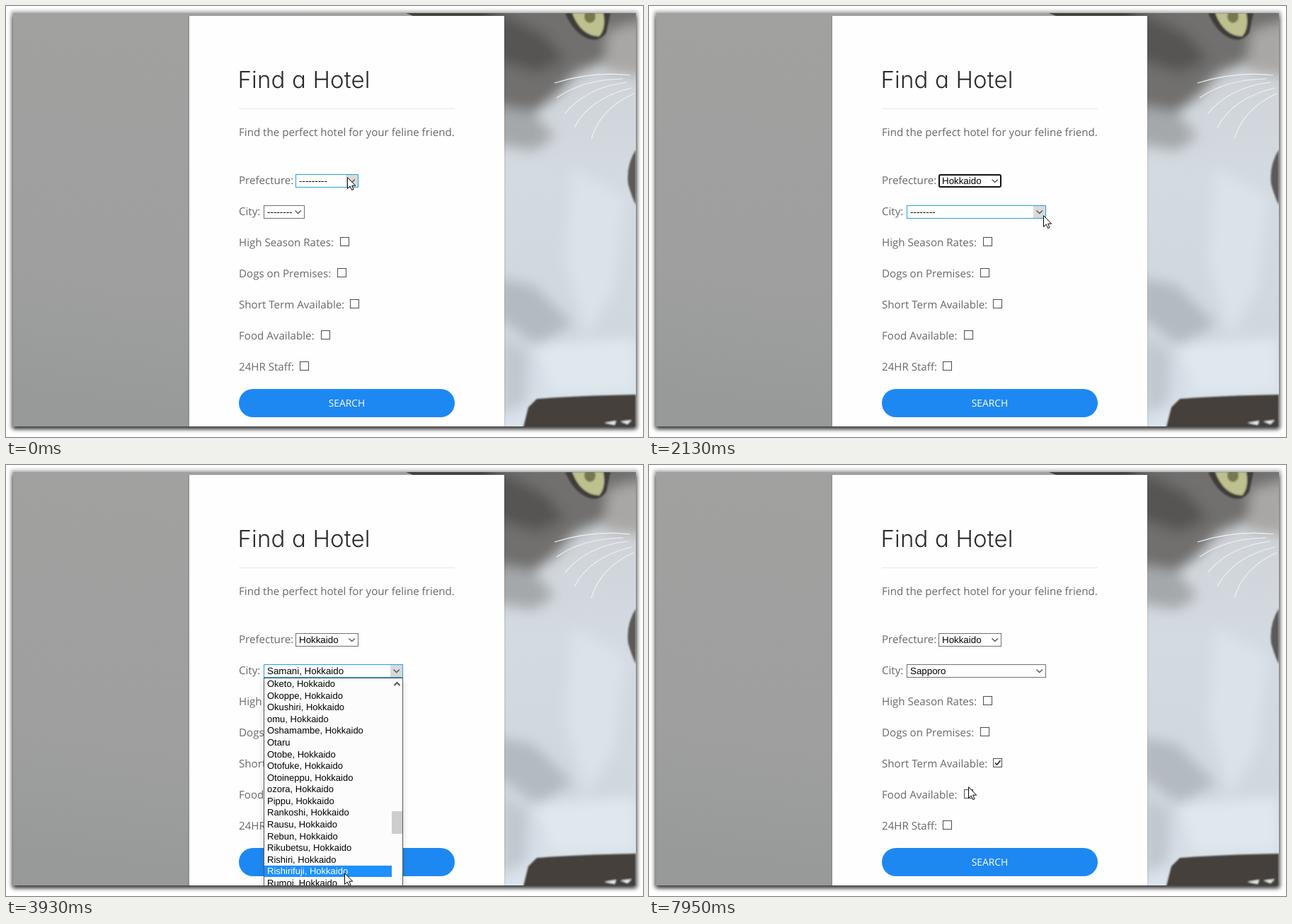
Animation of 900 by 610 pixels, one loop 8000 ms. Source, as an HTML page:

```html
<!DOCTYPE html>
<html lang="en">
<head>
<meta charset="utf-8">
<title>Find a Hotel</title>
<style>
  html, body { margin: 0; width: 100%; height: 100%; overflow: hidden; background: #fff; }
  #win {
    position: absolute; left: 10px; top: 10px; width: 880px; height: 585px;
    box-shadow: 0 0 5px 3px rgba(0, 0, 0, .28), 0 4px 6px rgba(0, 0, 0, .7);
  }
  svg { display: block; width: 880px; height: 585px; overflow: hidden; }
  text { text-rendering: geometricPrecision; white-space: pre; }
  .title { font: 300 33px Inter, Lato, sans-serif; font-feature-settings: "cv11"; letter-spacing: .15px; fill: #2b2b2f; }
  .label { font: 15.14px "Open Sans", "Noto Sans", sans-serif; fill: #68686b; }
  .go { font: 13.8px "Open Sans", "Noto Sans", sans-serif; fill: #fff; text-anchor: middle; }
  .opt { font: 13.333px "Liberation Sans", Arial, sans-serif; fill: #000; }
  .list .opt { font-size: 13px; }
  .opt.on { fill: #fff; }
  .frame { fill: #fff; stroke: #6f6f6f; }
  .arrow { fill: none; stroke: #555; stroke-width: 1.4; }
  .list .arrow { stroke-width: 2; }
  .grip { fill: #dadada; visibility: hidden; }
  .hover .frame { stroke: #26a0da; }
  .hover .grip { visibility: visible; }
  .focus .frame { stroke: #111; stroke-width: 2; }
  .box rect { fill: #fff; stroke: #4c4c4c; }
  .box path { fill: none; stroke: #222; stroke-width: 1.6; visibility: hidden; }
  .box.hot rect { stroke: #0078d7; }
  .box.ticked path { visibility: visible; }
  .list { display: none; }
</style>
</head>
<body>
<div id="win">
<svg id="svg" viewBox="10 10 880 585">
  <defs>
    <linearGradient id="wall" x1=".6" y1="0" x2="0.4" y2="1">
      <stop offset="0" stop-color="#a1a1a0"/>
      <stop offset=".7" stop-color="#9f9f9f"/>
      <stop offset="1" stop-color="#989a9a"/>
    </linearGradient>
    <linearGradient id="fur" x1="0" y1="0" x2="0" y2="1">
      <stop offset="0" stop-color="#cdd0d3"/>
      <stop offset=".4" stop-color="#d3dae1"/>
      <stop offset=".8" stop-color="#cfd8df"/>
      <stop offset="1" stop-color="#dbe4ec"/>
    </linearGradient>
    <filter id="soft" x="-30%" y="-30%" width="160%" height="160%"><feGaussianBlur stdDeviation="9"/></filter>
    <filter id="fine"><feGaussianBlur stdDeviation="1.2"/></filter>
    <filter id="shade" x="-30%" y="-10%" width="160%" height="120%"><feGaussianBlur stdDeviation="5"/></filter>
  </defs>

  <rect x="10" y="10" width="880" height="585" fill="url(#wall)"/>
  <path d="M565 10H704V14H575Z" fill="#45423f"/>

  <g id="cat">
    <rect x="704" y="10" width="186" height="585" fill="url(#fur)"/>
    <g filter="url(#soft)">
      <path d="M685 -10H910V50L860 72 805 95 775 128 735 158 685 160Z" fill="#716f6e"/>
      <path d="M690 5L760 40 790 75 750 95 690 75Z" fill="#575553"/>
      <path d="M850 35L905 20V100L845 92Z" fill="#a9a7a6"/>
      <path d="M690 140L745 150 775 185 745 205 690 195Z" fill="#a5a8ab"/>
      <path d="M695 385L745 395 800 450 750 480 695 440Z" fill="#b3bac0"/>
      <path d="M800 230L875 270 860 400 820 470 790 360Z" fill="#dbe2e9"/>
      <path d="M745 480L890 470V545L770 548Z" fill="#e0e8ef"/>
      <path d="M700 470L735 490 735 560 700 580Z" fill="#bfc8cf"/>
    </g>
    <g filter="url(#fine)">
      <path d="M790 10H854L848 38Q838 52 822 46 802 38 790 10Z" fill="#3f3c3a"/>
      <path d="M800 10H844Q848 32 838 43 812 42 800 10Z" fill="#bfc08f"/>
      <ellipse cx="825" cy="15" rx="8" ry="9" fill="#77784f"/>
      <path d="M890 203Q876 225 879 252 884 270 890 282Z" fill="#5b5a59"/>
      <path d="M730 600L738 568 750 556Q800 552 890 550V600Z" fill="#453f3b"/>
      <path d="M845 590L862 587 860 593ZM868 588L884 586 878 592Z" fill="#e8eaec"/>
    </g>
    <g fill="none" stroke="#f0f2f4" stroke-width="1.2">
      <path d="M775 109Q830 92 882 98M778 130Q815 104 872 103M790 152Q820 115 878 108M803 172Q825 130 884 116M827 188Q840 145 887 124"/>
    </g>
  </g>

  <rect x="258" y="14" width="447" height="590" fill="#000" opacity=".12" filter="url(#fine)"/>
  <rect x="259" y="14" width="445" height="590" fill="#fefefe"/>
  <text class="title" x="327.5" y="116">Find a Hotel</text>
  <path d="M329 145.5H634" stroke="#e6e6e6"/>
  <text class="label" x="329" y="184">Find the perfect hotel for your feline friend.</text>
  <text class="label" x="329" y="252">Prefecture:</text>
  <text class="label" x="329" y="296">City:</text>
  <g id="checks"></g>
  <rect x="329" y="542" width="305" height="40" rx="20" fill="#1e88f2"/>
  <text class="go" x="481.5" y="567">SEARCH</text>
  <g id="selects"></g>
  <g id="lists"></g>
  <path id="cursor" d="M.5 .7V16.6L4.2 13.1 6.6 18.5 9 17.5 6.7 12.2H11.7Z" fill="#fff" stroke="#000"/>
</svg>
</div>
<script>
const LOOP = 8000, ROW = 16.59;
const $ = id => document.getElementById(id);

function add(parent, tag, attrs, text) {
  const el = document.createElementNS("http://www.w3.org/2000/svg", tag);
  for (const k in attrs) el.setAttribute(k, attrs[k]);
  if (text) el.textContent = text;
  parent.append(el);
  return el;
}

// Checkboxes
const boxes = [
  ["High Season Rates:", 472], ["Dogs on Premises:", 468], ["Short Term Available:", 486],
  ["Food Available:", 445], ["24HR Staff:", 415]
].map(([label, x], i) => {
  const y = 327 + 44 * i;
  add($("checks"), "text", { class: "label", x: 329, y: y + 13 }, label);
  const g = add($("checks"), "g", { class: "box" });
  add(g, "rect", { x: x + .5, y: y + .5, width: 12, height: 12 });
  add(g, "path", { d: `M${x + 3} ${y + 6.5}l2.5 2.8 5-6` });
  return g;
});

// Closed select boxes
function makeSelect(x, y) {
  const g = add($("selects"), "g", {});
  const frame = add(g, "rect", { class: "frame" });
  const grip = add(g, "rect", { class: "grip", y: y + 1, width: 17, height: 17 });
  const arrow = add(g, "path", { class: "arrow" });
  const value = add(g, "text", { class: "opt", x: x + 5, y: y + 14 });
  return (text, w, look) => {
    const ring = look === "focus" ? .5 : 0;
    g.setAttribute("class", look);
    frame.setAttribute("x", x + .5 + ring);
    frame.setAttribute("y", y + .5 + ring);
    frame.setAttribute("width", w - 1 - 2 * ring);
    frame.setAttribute("height", 18 - 2 * ring);
    frame.setAttribute("rx", ring * 4);
    grip.setAttribute("x", x + w - 18);
    arrow.setAttribute("d", `M${x + w - 13.5} ${y + 7.5}l4.2 4 4.2-4`);
    value.textContent = text;
  };
}
const drawPref = makeSelect(409, 238), drawCity = makeSelect(364, 282);

// Open lists
function makeList(x, y, w, names, thumbY, thumbH) {
  const g = add($("lists"), "g", { class: "list" }), h = 20 * ROW + 2, right = x + w;
  add(g, "rect", { x, y: y + 4, width: w, height: h, fill: "#000", opacity: .16, filter: "url(#shade)" });
  add(g, "rect", { x: x + .5, y: y + .5, width: w - 1, height: h, fill: "#fcfcfc", stroke: "#5a5a5a" });
  add(g, "rect", { x: right - 16, y: thumbY, width: 15, height: thumbH, fill: "#cdcdcd" });
  add(g, "path", { class: "arrow", d: `M${right - 12.5} ${y + 11}l4-4 4 4` });
  const bar = add(g, "rect", { x: x + 1, width: w - 17, height: 16, fill: "#1e90ff" });
  const rows = names.map((n, i) => add(g, "text", { class: "opt", x: x + 5, y: y + 13 + ROW * i }, n));
  return (open, row) => {
    g.style.display = open ? "inline" : "none";
    bar.style.display = row < 0 ? "none" : "inline";
    bar.setAttribute("y", Math.round(y + .8 + ROW * Math.max(row, 0)));
    rows.forEach((t, i) => t.classList.toggle("on", i === row));
  };
}
const towns = s => s.split(" ").map(n => /^(Otaru|Sapporo|-+)$/.test(n) ? n : n + ", Hokkaido");
const lists = {
  pref: makeList(409, 257, 89, ("--------- Hokkaido Aomori Iwate Miyagi Akita Yamagata Fukushima Ibaraki Tochigi " +
    "Gunma Saitama Chiba Tokyo Kanagawa Niigata Toyama Ishikawa Fukui Yamanashi").split(" "), 274, 125),
  top: makeList(364, 301, 197, towns("-------- Abashiri Abira Aibetsu Akabira Akkeshi Asahikawa Ashibetsu Ashoro " +
    "Assabu Atsuma Bibai Biei Bifuka Bihoro Biratori Chippubetsu Chitose"), 318, 33),
  typed: makeList(364, 301, 197, towns("Oketo Okoppe Okushiri omu Oshamambe Otaru Otobe Otofuke Otoineppu ozora " +
    "Pippu Rankoshi Rausu Rebun Rikubetsu Rishiri Rishirifuji Rumoi"), 490, 32)
};

// Time, cursor position, and what changes from then on
const steps = [
  [0, 482, 242, { pref: "---------", prefLook: "hover", city: "--------", cityW: 58, cityLook: "", list: "", row: -1, hot: -1, ticked: false }],
  [580, 466, 276, { list: "pref", row: 1 }],
  [1030, 466, 278, { list: "", row: -1, pref: "Hokkaido", prefLook: "focus" }],
  [1250, 465, 281, { cityW: 197, cityLook: "hover" }],
  [1470, 497, 285],
  [1690, 540, 290],
  [1910, 567, 294, { cityLook: "" }],
  [2130, 557, 296, { cityLook: "hover" }],
  [2580, 557, 296, { prefLook: "", list: "top", row: 0 }],
  [2820, 557, 296, { city: "Samani, Hokkaido", list: "typed", row: -1 }],
  [3270, 530, 358, { row: 3 }],
  [3490, 497, 422, { row: 7 }],
  [3710, 484, 505, { row: 12 }],
  [3930, 478, 577, { row: 16 }],
  [4380, 552, 545, { city: "Sapporo", cityLook: "focus", list: "", row: -1 }],
  [4610, 600, 437],
  [4830, 645, 437],
  [5060, 610, 388],
  [5280, 553, 336],
  [5500, 514, 347],
  [5720, 479, 333, { hot: 0 }],
  [5940, 476, 377, { hot: 1 }],
  [6390, 481, 394, { hot: -1 }],
  [6610, 487, 409],
  [6830, 490, 417, { hot: 2 }],
  [7050, 490, 417, { ticked: true, cityLook: "" }],
  [7950, 451, 455, { hot: -1 }]
];
let last = {};
const states = steps.map(([t, x, y, change]) => last = { ...last, ...change, t, x, y });

function draw(s) {
  drawPref(s.pref, 89, s.prefLook);
  drawCity(s.city, s.cityW, s.cityLook);
  for (const k in lists) lists[k](s.list === k, s.row);
  boxes.forEach((b, i) => {
    b.classList.toggle("hot", i === s.hot);
    b.classList.toggle("ticked", i === 2 && s.ticked);
  });
  $("cursor").setAttribute("transform", `translate(${s.x} ${s.y})`);
}

const start = performance.now();
let shown;
function tick() {
  const t = (performance.now() - start) % LOOP;
  const s = states.findLast(v => v.t <= t);
  if (s !== shown) draw(shown = s);
  requestAnimationFrame(tick);
}
tick();
</script>
</body>
</html>
```
